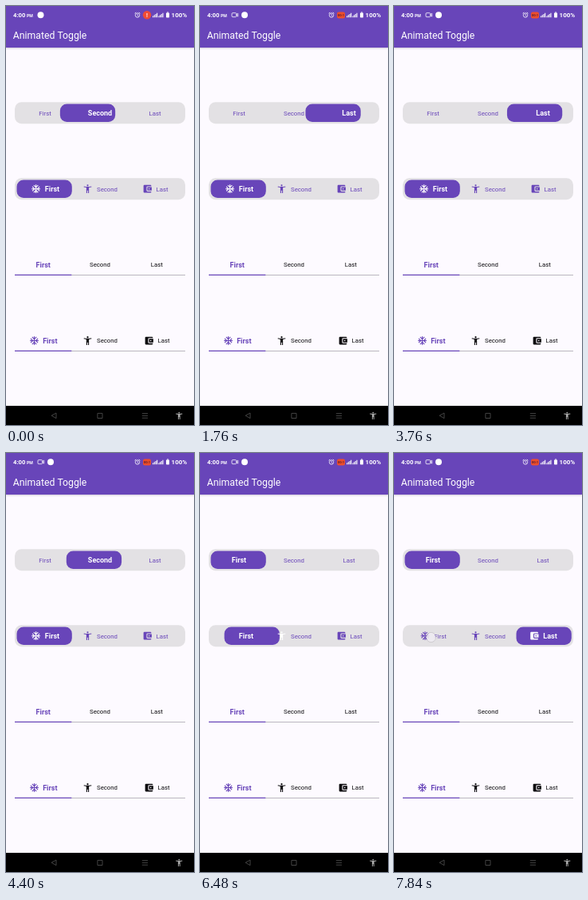
Write an HTML page with a canvas that moves like this. It is 236 px wide and 524 px high and loops after 8000 ms.

```html
<!DOCTYPE html>
<html lang="en">
<head>
<meta charset="utf-8">
<title>Animated Toggle</title>
<style>
  html, body { margin: 0; width: 100%; height: 100%; overflow: hidden; background: #fdfaff; }
  canvas { display: block; width: 236px; height: 524px; }
</style>
</head>
<body>
<canvas id="stage"></canvas>
<script>
const W = 236, H = 524, LOOP = 8000;
const PURPLE = '#6845b9', TRACK = '#e3e1e4', PAGE = '#fdfaff', WHITE = '#fff', BLACK = '#0c0b0e';
const LABELS = ['First', 'Second', 'Last'];

const canvas = document.getElementById('stage');
const ctx = canvas.getContext('2d');
const dpr = window.devicePixelRatio || 1;
canvas.width = W * dpr;
canvas.height = H * dpr;

// Each move slides a thumb between tab indices.
const textMoves = [
  { at: -730, dur: 920, from: 0, to: 1 },
  { at: 1080, dur: 920, from: 1, to: 2 },
  { at: 3400, dur: 1560, from: 2, to: 0 }
];
const iconMoves = [{ at: 6040, dur: 1560, from: 0, to: 2 }];
const taps = [
  { at: 800, end: 1120, x: 194.5, y: 130.5 },
  { at: 2880, end: 3440, x: 52.5, y: 134.5 },
  { at: 5520, end: 6000, x: 195.5, y: 230.5 },
  { at: 7840, end: 8000, x: 46.5, y: 230.5 }
];

// Cubic bezier (.42, 0, .75, .85), solved by bisection.
function ease(u) {
  if (u <= 0) return 0;
  if (u >= 1) return 1;
  const curve = (s, a, b) => 3 * (1 - s) ** 2 * s * a + 3 * (1 - s) * s * s * b + s ** 3;
  let lo = 0, hi = 1;
  for (let i = 0; i < 24; i++) {
    const mid = (lo + hi) / 2;
    if (curve(mid, 0.42, 0.75) < u) lo = mid; else hi = mid;
  }
  return curve(lo, 0, 0.85);
}

function position(moves, t) {
  let pos = moves[0].from;
  for (const m of moves) {
    if (t >= m.at) pos = m.from + (m.to - m.from) * ease((t - m.at) / m.dur);
  }
  return pos;
}

function box(x, y, w, h, r, color) {
  ctx.fillStyle = color;
  ctx.beginPath();
  ctx.roundRect(x, y, w, h, r);
  ctx.fill();
}

function disc(x, y, r, color) {
  ctx.fillStyle = color;
  ctx.beginPath();
  ctx.arc(x, y, r, 0, Math.PI * 2);
  ctx.fill();
}

function line(points, color, width, close) {
  ctx.strokeStyle = color;
  ctx.lineWidth = width;
  ctx.beginPath();
  points.forEach(([x, y]) => ctx.lineTo(x, y));
  if (close) ctx.closePath();
  ctx.stroke();
}

function text(str, x, y, size, color, weight = 400, align = 'center') {
  ctx.font = `${weight} ${size}px Roboto, sans-serif`;
  ctx.textAlign = align;
  ctx.fillStyle = color;
  ctx.fillText(str, x, y);
}

function label(i, x, y, color, bold) {
  text(LABELS[i], x, y + (bold ? 3.2 : 2.8), bold ? 9 : 7.8, color, bold ? 700 : 400);
}

const person = new Path2D('M20.5 6c-2.61.7-5.67 1-8.5 1s-5.89-.3-8.5-1L3 8c1.86.5 4 .83 6 1v13h2v-6h2v6h2V9c2-.17 4.14-.5 6-1zM12 6a2 2 0 1 0 0-4a2 2 0 0 0 0 4z');
const wallet = new Path2D('M21 18v1a2 2 0 0 1-2 2H5a2 2 0 0 1-2-2V5a2 2 0 0 1 2-2h14a2 2 0 0 1 2 2v1h-9a2 2 0 0 0-2 2v8a2 2 0 0 0 2 2zM12 16h10V8H12zM17.5 12a1.5 1.5 0 1 1-3 0a1.5 1.5 0 0 1 3 0z');

function snowflake(color) {
  ctx.translate(12, 12);
  for (let i = 0; i < 4; i++) {
    line([[0, 0], [0, -10]], color, 2);
    line([[-5, -8.4], [0, -3.4], [5, -8.4]], color, 2);
    ctx.rotate(Math.PI / 2);
  }
}

function icon(i, x, y, color, size = 13) {
  ctx.save();
  ctx.translate(x - size / 2, y - size / 2);
  ctx.scale(size / 24, size / 24);
  ctx.fillStyle = color;
  if (i === 0) snowflake(color);
  else ctx.fill(i === 1 ? person : wallet, 'evenodd');
  ctx.restore();
}

function statusBar(t) {
  const recording = t >= 160;
  text('4:00', 9, 14, 7.7, WHITE, 700, 'left');
  text('PM', 26, 14, 5.2, WHITE, 700, 'left');
  if (recording) {
    ctx.strokeStyle = WHITE;
    ctx.lineWidth = 0.8;
    ctx.beginPath();
    ctx.roundRect(40, 8.7, 5.6, 5, 1);
    ctx.stroke();
    line([[45.8, 10.6], [47.6, 9.3], [47.6, 13.1], [45.8, 11.8]], WHITE, 0.8, true);
  }
  disc(recording ? 56 : 43.5, 11.2, 4, WHITE);

  ctx.strokeStyle = WHITE;
  ctx.lineWidth = 0.8;
  ctx.beginPath();
  ctx.arc(165, 11.5, 2.7, 0, Math.PI * 2);
  ctx.stroke();
  line([[165, 9.8], [165, 11.7], [166.3, 12.4]], WHITE, 0.7);
  line([[161.6, 9.3], [163.2, 7.9]], WHITE, 0.8);
  line([[166.8, 7.9], [168.4, 9.3]], WHITE, 0.8);

  if (recording) {
    box(172, 7.4, 10, 8, 2.2, '#ee4e2c');
    text('00:1', 177, 13, 4.2, '#5a2030', 700);
  } else {
    disc(177, 11.3, 5.2, '#ee4b35');
    text('!', 177, 14, 7, WHITE, 700);
  }
  for (const x of [184, 191.3]) {
    for (let i = 0; i < 4; i++) {
      box(x + i * 1.7, 12.6 - i * 1.25, 1.1, 1.6 + i * 1.25, 0, WHITE);
    }
  }
  box(201, 8.4, 4, 6, 0.7, WHITE);
  box(202.1, 7.6, 1.8, 1, 0, WHITE);
  text('100%', 207.6, 14.1, 8, WHITE, 700, 'left');
}

function header(t) {
  ctx.save();
  ctx.shadowColor = 'rgba(60,40,90,.25)';
  ctx.shadowBlur = 2 * dpr;
  ctx.shadowOffsetY = 0.6 * dpr;
  box(0, 0, W, 52, 0, PURPLE);
  ctx.restore();
  statusBar(t);
  text('Animated Toggle', 8.8, 41, 12.25, WHITE, 400, 'left');
}

function track(y, pos) {
  box(11, y, 214, 27, 8.5, TRACK);
  box(13.5 + pos * 70, y + 2.3, 69.3, 22.5, 8.5, PURPLE);
}

function textToggle(t) {
  const pos = position(textMoves, t);
  const active = Math.round(pos);
  track(120.3, pos);
  LABELS.forEach((_, i) => {
    label(i, 49 + i * 69, 133.7, i === active ? WHITE : PURPLE, i === active);
  });
}

function iconToggle(t) {
  const pos = position(iconMoves, t);
  const active = Math.round(pos);
  const lit = Math.ceil(pos);
  const iconX = [39, 102.5, 177.5];
  const labelX = [58, 127, 196];
  track(215.2, pos);
  LABELS.forEach((_, i) => {
    const on = i === active;
    icon(i, iconX[i] - (on ? 1.4 : 0), 228.7, i === lit ? WHITE : PURPLE);
    label(i, labelX[i], 228.7, on ? WHITE : PURPLE, on);
  });
}

function underline(y) {
  box(11, y, 214, 0.8, 0, '#a5a1aa');
  box(11, y - 0.4, 71.3, 1.3, 0, PURPLE);
}

function tabRows() {
  const iconX = [35.5, 102.5, 179.5];
  const labelX = [55.3, 127, 198];
  LABELS.forEach((_, i) => {
    const color = i ? BLACK : PURPLE;
    label(i, 46.7 + i * 71.3, 323.4, color, !i);
    icon(i, iconX[i], 418.5, color);
    label(i, labelX[i], 418.5, color, !i);
  });
  underline(336.2);
  underline(431.2);
}

function navBar() {
  box(0, 500, W, 24, 0, '#000');
  const gray = '#4b4b4b';
  line([[57, 512.3], [63, 509], [63, 515.6]], gray, 0.9, true);
  line([[114.9, 509.4], [121, 509.4], [121, 515.5], [114.9, 515.5]], gray, 0.9, true);
  for (let i = 0; i < 3; i++) line([[170.8, 509.6 + i * 2.8], [178, 509.6 + i * 2.8]], gray, 0.9);
  icon(1, 217.3, 512.3, '#a8a8a8', 11);
}

function tapMarks(t) {
  for (const tap of taps) {
    if (t < tap.at || t >= tap.end) continue;
    disc(tap.x, tap.y, 6.4, 'rgba(110,105,120,.22)');
    disc(tap.x, tap.y, 5.7, 'rgba(245,242,248,.82)');
  }
}

function draw(now) {
  const t = now % LOOP;
  ctx.setTransform(dpr, 0, 0, dpr, 0, 0);
  box(0, 0, W, H, 0, PAGE);
  header(t);
  textToggle(t);
  iconToggle(t);
  tabRows();
  navBar();
  tapMarks(t);
}

const start = performance.now();
function tick() {
  draw(performance.now() - start);
  requestAnimationFrame(tick);
}
tick();
</script>
</body>
</html>
```
